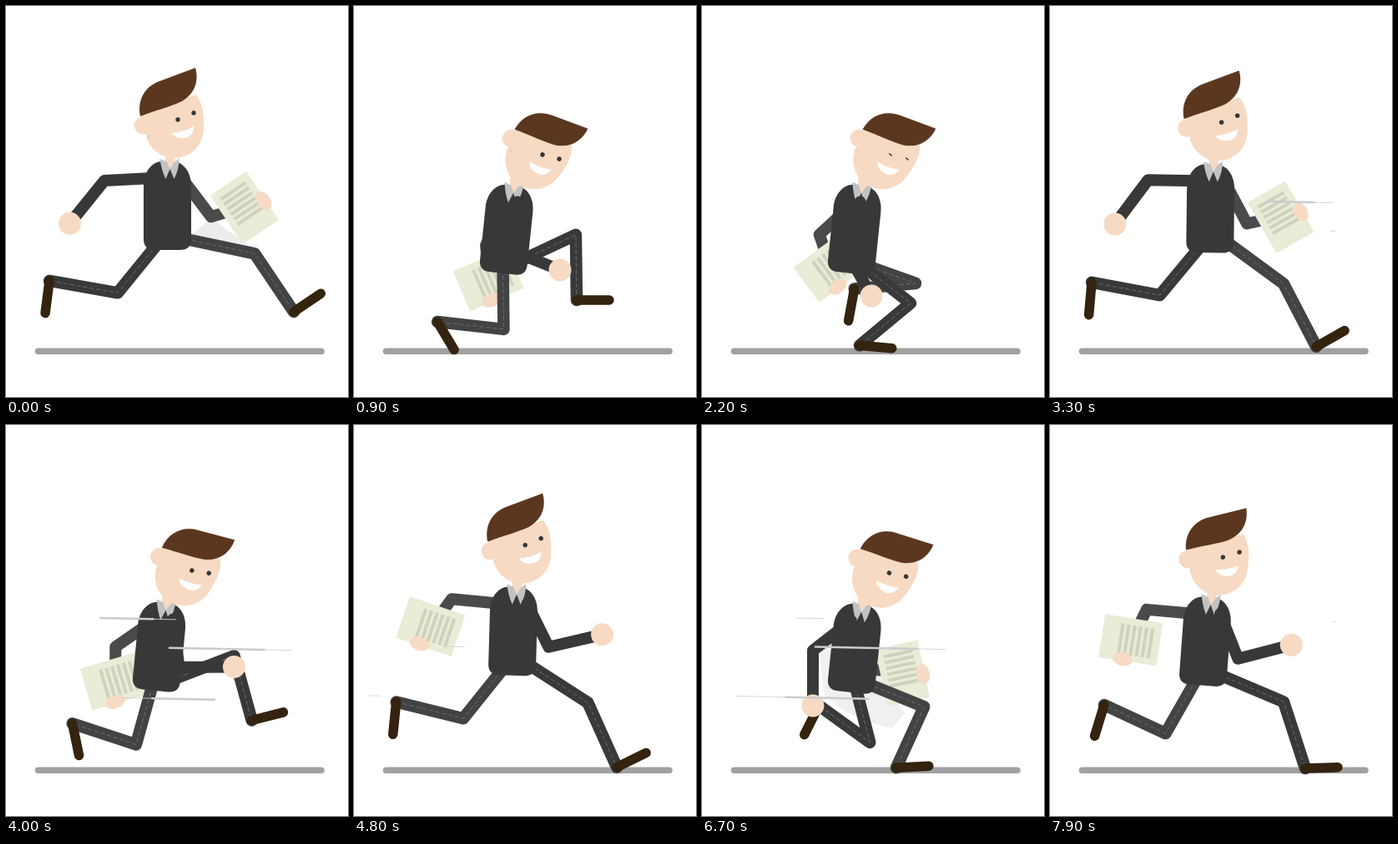
Animation of 410 by 468 pixels, one loop 8000 ms. Source, as an HTML page with a canvas:

```html
<!DOCTYPE html>
<html lang="en">
<head>
<meta charset="utf-8">
<title>Running clerk</title>
<style>
  html, body { margin: 0; width: 100%; height: 100%; overflow: hidden; background: #fff; }
  canvas { display: block; width: 410px; height: 468px; }
</style>
</head>
<body>
<canvas id="stage" width="410" height="468"></canvas>
<script>
const ctx = document.getElementById('stage').getContext('2d');
const LOOP = 8000, CYCLE = 3000, STEP = CYCLE / 2, FRAME = 100, RAD = Math.PI / 180;
const SKIN = '#f7dac3', SUIT = '#383838', FAR_LEG = '#424344', FAR_ARM = '#4a4a4a', SHOE = '#33230f';

// Smooth, non-overshooting path through cyclic keys [phase, ...values].
function path(keys) {
  const n = keys.length, key = i => keys[(i + n) % n];
  const gap = i => (key(i + 1)[0] - key(i)[0] + CYCLE) % CYCLE;
  const diff = (i, c) => key(i + 1)[c] - key(i)[c];
  const slope = (i, c) => {
    const a = diff(i - 1, c) / gap(i - 1), b = diff(i, c) / gap(i);
    return a * b > 0 ? 2 * a * b / (a + b) : 0;
  };
  return time => {
    const t = time % CYCLE;
    let i = n - 1;
    while (keys[i][0] > t) i--;
    const g = gap(i), u = (t - keys[i][0]) / g, v = 1 - u;
    return keys[i].slice(1).map((p, k) => p + diff(i, k + 1) * u * u * (3 - 2 * u) +
      g * u * v * (slope(i, k + 1) * v - slope(i + 1, k + 1) * u));
  };
}

// One path serves both legs, and one both arms, half a cycle apart.
const anklePath = path([ // phase, x, y, shoe angle
  [0, 345, 366, -34], [300, 317, 409, -29], [430, 306, 411, -2], [700, 215, 410, -3],
  [862, 100, 378, 59], [1180, 58, 328, 100], [1800, 50, 331, 95], [1930, 65, 335, 107],
  [2200, 158, 336, 117], [2362, 267, 352, 0], [2724, 335, 356, -32]
]);
const handPath = path([ // phase, x, y
  [0, 309, 233], [660, 265, 298], [740, 203, 347], [862, 165, 352], [1200, 76, 260],
  [1800, 78, 261], [2200, 143, 338], [2362, 247, 316], [2700, 306, 235]
]);

const smooth = (a, b, t) => {
  const u = Math.min(1, Math.max(0, (t - a) / (b - a)));
  return u * u * (3 - 2 * u);
};

// Every step sinks the body, tips the head forward, then springs up again.
function bodyPose(clock) {
  const s = clock % STEP;
  const sink = smooth(200, 560, s) - smooth(900, 1300, s);
  const nod = smooth(330, 720, s) - smooth(880, 1250, s);
  return {
    x: 193.5 - 4.5 * sink, y: 187 + 28.5 * sink, lean: 6 * sink,
    headX: 215.5 - 3 * sink + 23.5 * nod, headY: 132 + 28.5 * sink + 20 * nod, tilt: 37 * nod
  };
}

// Where a limb leaves the torso: it slides a little towards its far end.
function socket(body, depth, end, shift, slide) {
  const x = body.x - depth * Math.sin(body.lean * RAD);
  const y = body.y + depth * Math.cos(body.lean * RAD);
  return [x + shift + slide * (end[0] - x), y];
}

// Middle joint of a two-bone limb; side picks the way it bends.
function joint([ax, ay], [bx, by], lenA, lenB, side) {
  const d = Math.hypot(bx - ax, by - ay), ux = (bx - ax) / d, uy = (by - ay) / d;
  const along = (lenA * lenA - lenB * lenB + d * d) / (2 * d);
  const out = side * Math.sqrt(Math.max(0, lenA * lenA - along * along));
  return [ax + ux * along + uy * out, ay + uy * along - ux * out];
}

function stroke(points, width, color, cap = 'round', dash = []) {
  ctx.lineWidth = width;
  ctx.strokeStyle = color;
  ctx.lineCap = cap;
  ctx.lineJoin = 'round';
  ctx.setLineDash(dash);
  ctx.beginPath();
  points.forEach(p => ctx.lineTo(...p));
  ctx.stroke();
}

function shape(d, color) {
  ctx.fillStyle = color;
  ctx.fill(new Path2D(d));
}

function oval(x, y, rx, ry, color) {
  ctx.fillStyle = color;
  ctx.beginPath();
  ctx.ellipse(x, y, rx, ry, 0, 0, 7);
  ctx.fill();
}

function at(x, y, angle, draw) {
  ctx.save();
  ctx.translate(x, y);
  ctx.rotate(angle * RAD);
  draw();
  ctx.restore();
}

function leg(phase, body, color) {
  const [x, y, angle] = anklePath(phase), ankle = [x, y];
  const hip = socket(body, 92, ankle, 7, 0.1);
  const bone = 71 + 0.084 * Math.hypot(x - hip[0], y - hip[1]);
  const bones = [hip, joint(hip, ankle, bone, bone, 1), ankle];
  stroke(bones, 14.5, color);
  stroke(bones, 1, '#6b6b6b', 'butt', [5, 3]);
  at(x, y, angle, () => stroke([[0, 0], [39, 0]], 11.5, SHOE));
}

function arm(phase, body, color) {
  const hand = handPath(phase), shoulder = socket(body, 19, hand, 0, 0.15);
  const elbow = joint(shoulder, hand, 58, 66, -1);
  stroke([shoulder, elbow, hand], 14, color);
  return { hand, angle: Math.atan2(hand[1] - elbow[1], hand[0] - elbow[0]) / RAD };
}

function paperArm(phase, body) {
  const { hand, angle } = arm(phase, body, FAR_ARM);
  at(...hand, angle - 17, () => {
    ctx.fillStyle = '#e9ecd6';
    ctx.fillRect(-50, -41, 52, 70);
    for (let y = -30; y < 10; y += 7.2) stroke([[-42, y], [-6, y]], 4, '#cfd2bf', 'butt');
    oval(0, 0, 8, 12, SKIN);
  });
}

function torso({ x, y, lean }) {
  at(x, y, lean, () => {
    shape('M-28.5 28C-28.5 12-19-1-6-1H6C19-1 28.5 12 28.5 28V92Q28.5 105 15 105H-15Q-28.5 105-28.5 92Z', SUIT);
    shape('M-3-14H9V6L4 9-2 5Z', SKIN);
    shape('M-9-4L-1-1 3 8-2 20Q-7 10-9-4ZM14-5L8 0 3 8 8 20Q14 9 14-5Z', '#c2c2c2');
  });
}

function head({ headX, headY, tilt }, blink) {
  at(headX, headY, tilt, () => {
    oval(-51.5, 11, 10.5, 10.5, SKIN);
    oval(-13.5, 15, 35, 35, SKIN);
    shape('M-54-2L12-26C20-16 22-4 21.5 15L-13 40-46 25Z', SKIN);
    stroke([[-47, 25], [-42, 23]], 0.8, '#e5c5ae');
    at(-54.5, 0, tilt * 0.1, () =>
      shape('M0 0C-4-20 6-36 23-42L66-58C70-44 67-28 50-18C38-12 18-7 0 0Z', '#5c3720'));
    for (const side of [-1, 1]) oval(side * 9.5, -side * 4, 2.7, blink ? 0.8 : 2.7, '#363636');
    shape('M-17 20Q-3 19 10 12Q9 25-2 26Q-13 27-17 20Z', '#fff');
  });
}

// A streak shoots out leftwards from x0 to x1, then its tail catches up.
function streak(t, x0, x1, y, grow, fade, thick) {
  const reach = ([a, b]) => x0 + (x1 - x0) * Math.min(1, Math.max(0, (t - a) / (b - a)));
  const front = reach(grow), len = reach(fade) - front;
  const point = u => [front + len * u, y + 0.02 * (front + len * u - x1)];
  if (len > 0.5) stroke([point(0), point(1)], 0.9, '#d3d3d3');
  if (len > 40) stroke(thick.map(point), 2.5, '#cbcbcd');
}

function streaks(t) {
  if (t < 3100) return;
  const s = (t - 3100) % 2400;
  streak(s, 342, 113, 231, [-10, 600], [190, 1365], [0, 0.7]);
  streak(s, 342, 110, 265, [170, 1330], [1045, 1770], [0, 0.78]);
  streak(s, 250, 18, 324, [500, 1280], [1050, 1740], [0.37, 1]);
}

// Pale wake of the paper.
function wake(phase) {
  if (phase < 100) shape('M221 275L246 254 292 287Z', '#ededed');
  if (phase > 600 && phase < 700) shape('M140 262L212 300 243 345 228 363Q175 352 146 322Z', '#f0eff1');
}

function draw(now) {
  const t = Math.floor(now % LOOP / FRAME) * FRAME;
  // The second step of each cycle runs slightly ahead of the first.
  const clock = t - 40 * Math.sin(2 * Math.PI * t / CYCLE);
  const body = bodyPose(clock);
  ctx.clearRect(0, 0, 410, 468);
  stroke([[38.5, 413.3], [378, 413.3]], 7.6, '#a1a1a1');
  wake(clock % CYCLE);
  paperArm(clock, body);
  leg(clock, body, FAR_LEG);
  leg(clock + STEP, body, '#38393a');
  torso(body);
  head(body, t >= 2200 && t < 2400);
  const { hand } = arm(clock + STEP, body, SUIT);
  oval(...hand, 13.5, 13.5, SKIN);
  streaks(t);
}

const start = performance.now();
(function tick() {
  draw(Math.max(0, performance.now() - start));
  requestAnimationFrame(tick);
})();
</script>
</body>
</html>
```
